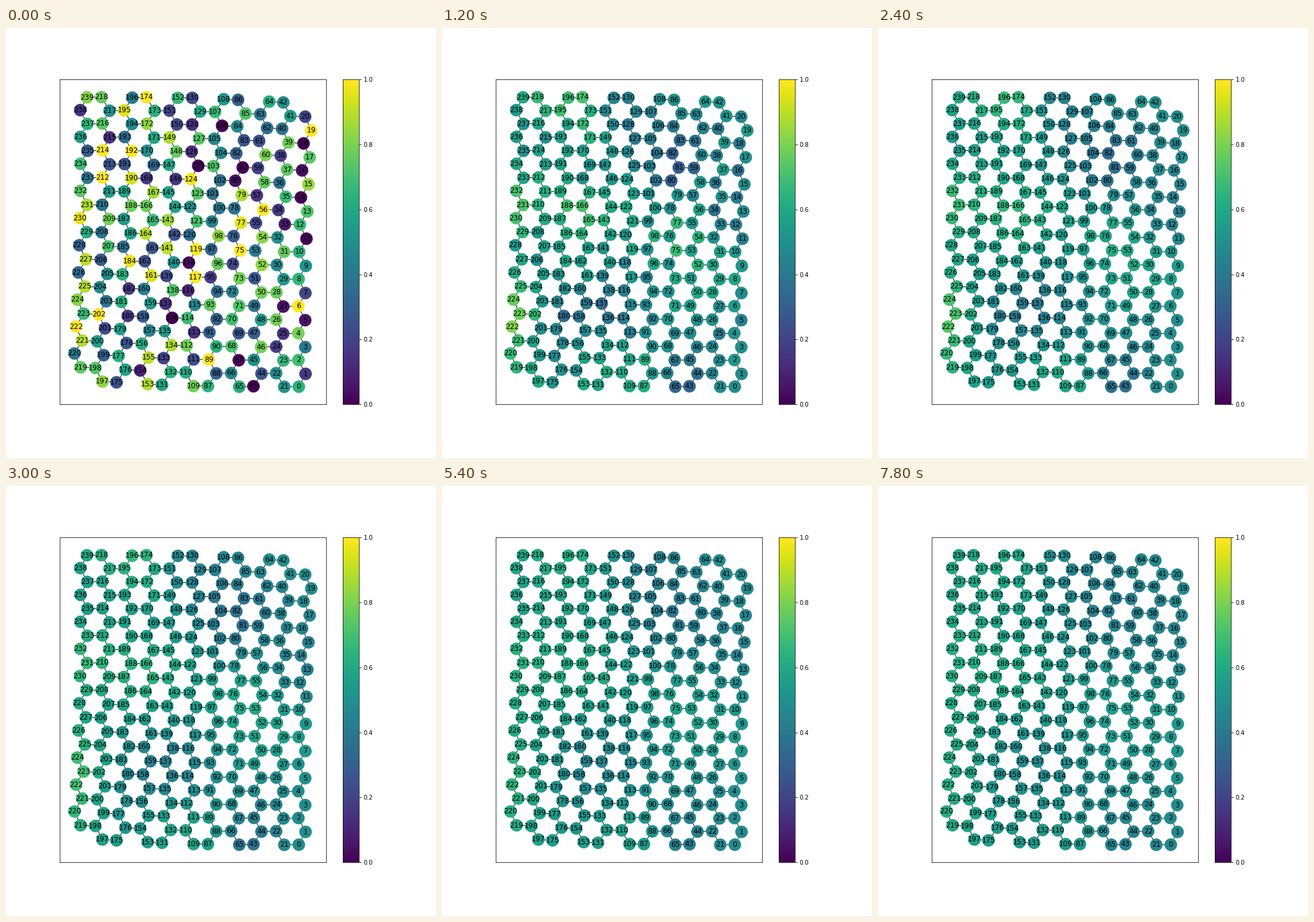
Write a matplotlib script that moves like this. It is 720 px wide and 720 px high and loops after 8000 ms.

```python
import numpy as np
import matplotlib.pyplot as plt
from matplotlib.animation import FuncAnimation
from matplotlib.cm import ScalarMappable
from matplotlib.collections import LineCollection
from matplotlib.colors import Normalize

SIZE, DPI = 720, 72
CHAINS, ROWS = 11, 22
TICK, HOLD, FRAMES = 200, 3, 40

# Regions that start above or below the average: x, y, amount
BUMPS = [(120, 490, 0.32), (122, 285, 0.25), (223, 118, 0.27),
         (405, 360, 0.25), (495, 425, 0.22), (240, 310, 0.18),
         (310, 560, 0.20), (385, 215, -0.33), (400, 600, -0.25),
         (290, 480, -0.25), (205, 490, -0.20), (300, 112, -0.20),
         (500, 345, -0.20)]
SPREAD = 32


def place(c, r):
    """Pixel position of the node in chain c, row r of the bowed lattice."""
    u = 1 - 2 * c / (CHAINS - 1)
    t = 2 * r / (ROWS - 1) - 1
    side = 1 if (c + r) % 2 else -1
    inner = 1 - u ** 8
    x = 312.9 + 184.1 * u + 6.1 * t + 5.2 * np.sin(np.pi / 2 * u) * t * t
    x += side * (5.8 + 1.3 * inner * t ** 6)
    y = 358.3 + 5.5 * u - (237.2 + 3.7 * (1 - u * u) ** 2) * t
    y += (2 + 2.5 * inner) * (t ** 3 - t) + 0.4 * side
    return x, y


def build_lattice():
    cells = [(c, r) for c in range(CHAINS) for r in range(ROWS)
             if (c, r) not in ((0, ROWS - 1), (CHAINS - 1, 0))]
    index = {cell: i for i, cell in enumerate(cells)}
    links = []
    for (c, r), i in index.items():
        if (c, r + 1) in index:
            links.append((i, index[c, r + 1]))
        if (c + r) % 2 == 0 and (c + 1, r) in index:
            links.append((i, index[c + 1, r]))
    return np.array([place(c, r) for c, r in cells]), links


def averaging_matrix(count, links):
    """Each node takes the mean of itself and its neighbours."""
    mix = np.eye(count)
    for a, b in links:
        mix[a, b] = mix[b, a] = 1
    return mix / mix.sum(axis=1, keepdims=True)


def start_values(pos, mix):
    """Smooth regions plus fine noise that averages out quickly."""
    x, y = pos.T
    field = 0.52 - 0.04 * (x - 313) / 184
    for bx, by, amount in BUMPS:
        dist = (x - bx) ** 2 + (y - by) ** 2
        field += amount * np.exp(-dist / (2 * SPREAD ** 2))
    noise = np.random.RandomState(4).uniform(-0.55, 0.55, len(pos))
    return np.clip(field + noise - mix @ noise, 0, 1)


pos, links = build_lattice()
mix = averaging_matrix(len(pos), links)
states = [start_values(pos, mix)]
for _ in range((FRAMES - 1) // HOLD):
    states.append(mix @ states[-1])

fig = plt.figure(figsize=(SIZE / DPI, SIZE / DPI), dpi=DPI, facecolor="white")
ax = fig.add_axes([0.125, 0.125, 0.62, 0.755])
ax.set(xlim=(90, 536.4), ylim=(630, 86.4), xticks=[], yticks=[])

scale = ScalarMappable(Normalize(0, 1), "viridis")
cax = fig.add_axes([0.78375, 0.125, 0.03775, 0.755])
fig.colorbar(scale, cax=cax, ticks=np.linspace(0, 1, 6))

ax.add_collection(LineCollection([pos[list(link)] for link in links],
                                 colors="black", linewidths=1, zorder=1))
dots = ax.scatter(*pos.T, s=400, c=states[0], cmap="viridis", vmin=0, vmax=1,
                  linewidths=1, edgecolors="face", zorder=2)
for i, (x, y) in enumerate(pos):
    ax.text(x, y, str(i), size=12, ha="center", va="center", zorder=3)


def update(frame):
    dots.set_array(states[frame // HOLD])
    return dots,


anim = FuncAnimation(fig, update, frames=FRAMES, interval=TICK,
                     repeat=True, repeat_delay=0)
plt.show()
```
